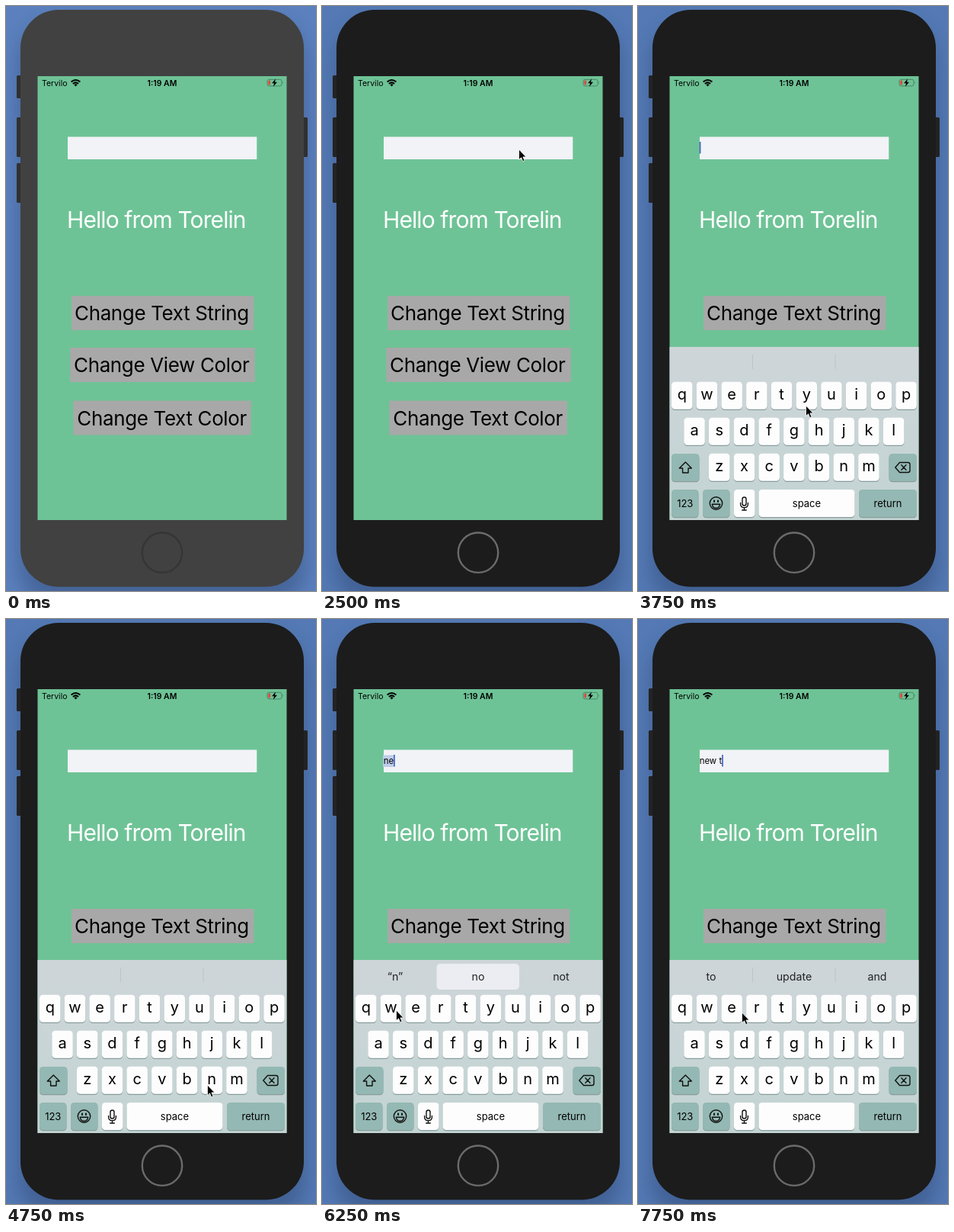
Write an HTML page that moves like this. It is 407x767 px and loops after 8 s.

```html
<!DOCTYPE html>
<html lang="en">
<head>
<meta charset="utf-8">
<title>Phone simulator</title>
<style>
  html, body { margin: 0; width: 100%; height: 100%; overflow: hidden; background: #5174b0; }
  svg { display: block; width: 100vw; height: 100vh; }
  text { font-family: Inter, Roboto, sans-serif; font-optical-sizing: none; white-space: pre; }
  .mid { text-anchor: middle; }
  .status { font-size: 10.5px; }
  .button { font-size: 26px; letter-spacing: -.014em; }
  .line { fill: none; stroke: #111; stroke-width: 1.4; stroke-linecap: round; stroke-linejoin: round; }
</style>
</head>
<body>
<svg viewBox="0 0 407 767" id="stage">
  <defs>
    <clipPath id="screenClip"><rect x="41.5" y="92" width="327" height="582"/></clipPath>
    <filter id="blur" x="-20%" y="-20%" width="140%" height="140%"><feGaussianBlur stdDeviation="13"/></filter>
    <linearGradient id="keyboardFill" x2="0" y2="1">
      <stop stop-color="#ced5d9"/><stop offset="1" stop-color="#c2d4d2"/>
    </linearGradient>
  </defs>

  <rect id="desktop" width="407" height="767"/>
  <rect x="17" y="22" width="376" height="765" rx="52" fill="#2a4470" opacity=".45" filter="url(#blur)"/>
  <g id="sideButtons">
    <rect x="14" y="91" width="8" height="30" rx="1.5"/>
    <rect x="14" y="146" width="8" height="52" rx="1.5"/>
    <rect x="14" y="206" width="8" height="52" rx="1.5"/>
    <rect x="388" y="146" width="8" height="52" rx="1.5"/>
  </g>
  <rect id="shell" x="19" y="5" width="372" height="756.5" rx="50"/>
  <circle id="home" cx="205" cy="716.7" r="26.2" fill="none" stroke-width="2.4"/>

  <g clip-path="url(#screenClip)">
    <rect x="41" y="92" width="328" height="582" fill="#6ec396"/>
    <text class="status" x="47" y="104.5">Tervilo</text>
    <g class="line" style="stroke: #000; stroke-width: 2; stroke-linecap: butt">
      <path d="M85.6 99.6Q91.5 94.3 97.4 99.6M87.9 102Q91.5 98.8 95.1 102"/>
    </g>
    <path d="M89.4 103.2Q91.5 101.5 93.6 103.2L91.5 105.4Z"/>
    <text class="status mid" x="205" y="104.5" font-weight="600">1:19 AM</text>
    <rect x="343" y="96.3" width="19" height="8.6" rx="2.4" fill="none" stroke="#477d61" stroke-width=".9"/>
    <path d="M363.3 99q1.6 1.6 0 3.2z" fill="#477d61"/>
    <rect x="344.3" y="97.6" width="2.8" height="6" rx="1" fill="#e2483e"/>
    <path d="M354 95.4L349 101.2H352L350.9 105.8L356 99.8H353Z"/>

    <rect x="81" y="171.5" width="248.3" height="29.5" fill="#f2f3f7"/>
    <rect id="selection" x="80" y="178.5" height="15.5" fill="#bfcdea"/>
    <text id="typed" x="80.7" y="190" font-size="11.4"></text>
    <rect id="caret" y="178" width="1.7" height="15.5" fill="#4163c8"/>
    <text x="80" y="291" font-size="30" letter-spacing="-.9" fill="#fff">Hello from Torelin</text>

    <g fill="#a8a8a8">
      <rect x="86" y="380" width="239.3" height="45"/>
      <rect x="84.3" y="448" width="242.5" height="45"/>
      <rect x="88.5" y="517.5" width="233.3" height="45"/>
    </g>
    <text class="button" x="90" y="412">Change Text String</text>
    <text class="button" x="89" y="480">Change View Color</text>
    <text class="button" x="93.3" y="550">Change Text Color</text>

    <g id="keyboard">
      <rect x="41" y="447" width="328" height="240" fill="url(#keyboardFill)"/>
      <path id="dividers" d="M150.5 457V476M259 457V476" stroke="#bcc4c8"/>
      <rect id="highlight" x="150.5" y="452" width="108.5" height="34" rx="5" fill="#ebedf2"/>
      <g id="suggestions" font-size="14.2" fill="#222"></g>
      <g id="keys"></g>
      <g class="line">
        <path d="M62.3 598L54.3 606H58.6V612H66V606H70.3Z"/>
        <path d="M343.5 598.5H354.5Q357 598.5 357 601V609Q357 611.5 354.5 611.5H343.5L337.8 605ZM345.8 601.8L352 608.2M352 601.8L345.8 608.2"/>
        <circle cx="102.5" cy="652" r="8.2"/>
        <path d="M97.3 653.3H107.7Q106.8 658.3 102.5 658.3T97.3 653.3Z"/>
        <path d="M100 648.5V650M105 648.5V650" stroke-width="2"/>
        <rect x="137" y="644" width="5" height="11" rx="2.5"/>
        <path d="M134.6 651.5V653Q134.6 657.6 139.5 657.6T144.4 653V651.5M139.5 657.6V661M136.7 661H142.3"/>
      </g>
    </g>
  </g>
  <path id="pointer" d="M.5 0V13.6L3.6 10.8L5.7 15.7L8 14.7L5.9 9.9H10Z" stroke="#fff" stroke-width=".8"/>
</svg>

<script>
const LOOP = 8000, STEP = 250;
const $ = id => document.getElementById(id);

function add(parent, tag, attrs, label = '') {
  const node = document.createElementNS('http://www.w3.org/2000/svg', tag);
  for (const name in attrs) node.setAttribute(name, attrs[name]);
  node.textContent = label;
  return parent.appendChild(node);
}
const set = (id, name, value) => $(id).setAttribute(name, value);
const show = (id, visible) => set(id, 'visibility', visible ? 'visible' : 'hidden');

function addKey(x, y, width, label = '', size = 20, fill = '#fdfdfd') {
  add($('keys'), 'rect', { x, y: y + 1.2, width, height: 36, rx: 4.5, fill: '#899c9c' });
  add($('keys'), 'rect', { x, y, width, height: 36, rx: 4.5, fill });
  add($('keys'), 'text', { x: x + width / 2, y: y + (size > 15 ? 23.6 : 22.6), 'font-size': size, class: 'mid' }, label);
}
const DARK = '#94b8b3';
[['qwertyuiop', 44], ['asdfghjkl', 60.3], ['zxcvbnm', 93]].forEach(([row, left], r) =>
  [...row].forEach((letter, i) => addKey(left + i * 32.7, 492.8 + r * 47, 27.5, letter)));
addKey(44, 587, 36.5, '', 13, DARK);
addKey(329.5, 587, 36.5, '', 13, DARK);
addKey(44, 634, 35.5, '123', 13, DARK);
addKey(85, 634, 35.5, '', 13, DARK);
addKey(126, 634, 27.5);
addKey(158.5, 634, 126, 'space', 13);
addKey(290, 634, 76, 'return', 13, DARK);

const words = [96, 205, 314].map(x => add($('suggestions'), 'text', { x, y: 474, class: 'mid' }));

// Each list runs in order of time: [start in ms, value].
const TYPED = [[0, ''], [5000, 'n'], [6000, 'ne'], [6500, 'new'], [7000, 'new '], [7500, 'new t']];
const PREDICTED = [[0, []], [5250, ['“n”']], [5750, ['“n”', 'no', 'not']],
  [6750, ['“new”', 'news', 'newest']], [7250, ['to', 'update', 'and']]];
const POINTER = [[750, 258, 188], [3250, 258, 188], [3500, 246, 330], [3750, 220, 524], [4000, 250, 584],
  [4250, 264, 611], [5000, 264, 611], [5500, 190, 568], [5750, 126, 516], [6000, 122, 512],
  [6250, 97, 513], [6500, 95, 513], [7000, 222, 656], [7250, 190, 545], [7500, 186, 512], [7750, 136, 516]];

const current = (list, t) => list.filter(([start]) => start <= t).pop();

function pointerAt(t) {
  const [t0, x0, y0] = current(POINTER, t) || POINTER[0];
  const [t1, x1, y1] = POINTER.find(([start]) => start > t) || [t0 + 1, x0, y0];
  const k = Math.max(0, (t - t0) / (t1 - t0));
  return [x0 + (x1 - x0) * k, y0 + (y1 - y0) * k];
}

// Critically damped spring: the keyboard slides in from below.
function keyboardDrop(t) {
  const phase = Math.max(0, t - 2666) * 0.01826;
  return 227 * (1 + phase) * Math.exp(-phase);
}

function draw(now) {
  const t = Math.floor(now % LOOP / STEP) * STEP;
  const active = t >= 750;
  set('desktop', 'fill', active ? '#5479b4' : '#5b80bd');
  set('shell', 'fill', active ? '#1c1c1c' : '#414141');
  set('sideButtons', 'fill', active ? '#232323' : '#303030');
  set('home', 'stroke', active ? '#6b6b6b' : '#353535');

  const text = current(TYPED, t)[1];
  $('typed').textContent = text;
  const end = 80.7 + (text ? $('typed').getComputedTextLength() : 0);
  set('caret', 'x', end);
  show('caret', t >= 1250 && (text || (t - 1250) % 750 < 500));
  const selected = text === 'ne';
  set('selection', 'width', selected ? end - 80 : 0);

  set('keyboard', 'transform', `translate(0 ${keyboardDrop(t)})`);
  const predicted = current(PREDICTED, t)[1];
  words.forEach((word, i) => word.textContent = predicted[i] || '');
  const highlighted = t >= 5750 && t < 6500;
  show('highlight', highlighted);
  show('dividers', !highlighted);

  show('pointer', active);
  set('pointer', 'transform', `translate(${pointerAt(t)})`);
}

function frame(now) {
  draw(now);
  requestAnimationFrame(frame);
}
draw(0);
requestAnimationFrame(frame);
</script>
</body>
</html>
```
